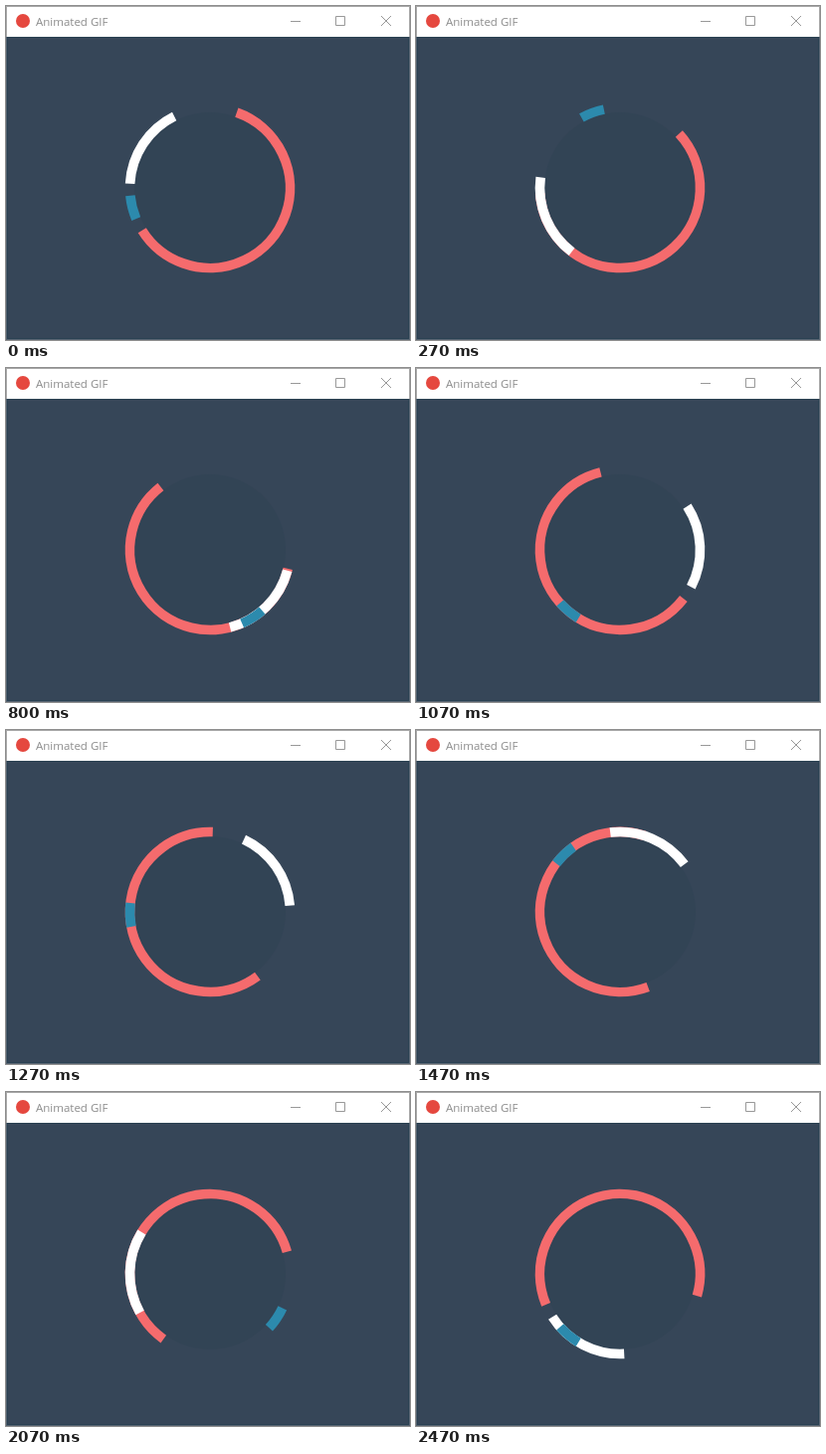
Write an HTML page that moves like this. It is 406x336 px and loops after 2540 ms.

```html
<!DOCTYPE html>
<html lang="en">
<head>
<meta charset="utf-8">
<title>Loader window</title>
<style>
  html, body { margin: 0; width: 100%; height: 100%; overflow: hidden; background: #fff; }
  svg { display: block; width: 406px; height: 336px; }
  text { font: 11.5px "Open Sans", "Noto Sans", sans-serif; fill: #8c8c8c; }
  .glyph { fill: none; stroke: #999; }
  .arc { fill: none; stroke-width: 9.6; }
</style>
</head>
<body>
<svg viewBox="0 0 406 336">
  <rect width="406" height="336" fill="#fff"/>
  <rect x=".5" y=".5" width="405" height="335" fill="none" stroke="#aaa"/>
  <circle cx="17" cy="15" r="7" fill="#e5483f"/>
  <text x="30" y="20">Animated GIF</text>
  <path class="glyph" d="M286 15.5h10M331.5 10.5h9v9h-9z"/>
  <path class="glyph" d="M377 10l10 10m0-10l-10 10"/>
  <rect y="31" width="406" height="305" fill="#566371"/>
  <rect x="1" y="31" width="404" height="304" fill="#2a4152"/>
  <rect x="2" y="32" width="402" height="302" fill="#364658"/>
  <circle cx="205" cy="183" r="76" fill="#324455"/>
  <g id="ring"></g>
</svg>
<script>
const LOOP = 2540, FRAMES = 38, STEP = 4;
const CX = 205, CY = 183, R = 80.5;

// Clockwise degrees from the top; the arcs turn at 1, -2 and 3 times the base angle.
const arcs = [
  { color: "#f56b6d", start: 19.5, length: 218.5, speed: 1 },
  { color: "#ffffff", start: 273, length: 60.5, speed: -2 },
  { color: "#2c8aad", start: 247.3, length: 17.2, speed: 3 }
];

// Tick number and number of steps turned by then
const keys = [[0, 0], [7, 12], [12, 21], [16, 27], [22, 35], [31, 49], [37, 57]];

const ring = document.getElementById("ring");
for (const arc of arcs) {
  arc.el = document.createElementNS("http://www.w3.org/2000/svg", "circle");
  const attrs = {
    class: "arc", cx: CX, cy: CY, r: R, stroke: arc.color,
    pathLength: 360, "stroke-dasharray": `${arc.length} ${360 - arc.length}`
  };
  for (const name in attrs) arc.el.setAttribute(name, attrs[name]);
  ring.append(arc.el);
}

// 15 ticks per second, on a 10 ms clock
const tickStart = i => Math.round(i * 20 / 3) * 10;

function tickAt(t) {
  let i = 0;
  while (i < FRAMES - 1 && tickStart(i + 1) <= t) i++;
  return i;
}

function angleAt(tick) {
  let k = 1;
  while (keys[k][0] < tick) k++;
  const [t0, s0] = keys[k - 1], [t1, s1] = keys[k];
  return STEP * Math.round(s0 + (s1 - s0) * (tick - t0) / (t1 - t0));
}

function draw(time) {
  const turn = angleAt(tickAt(time % LOOP));
  for (const { el, start, speed } of arcs) {
    el.setAttribute("transform", `rotate(${start + speed * turn - 90} ${CX} ${CY})`);
  }
}

function loop(now) {
  draw(now);
  requestAnimationFrame(loop);
}
draw(0);
requestAnimationFrame(loop);
</script>
</body>
</html>
```
